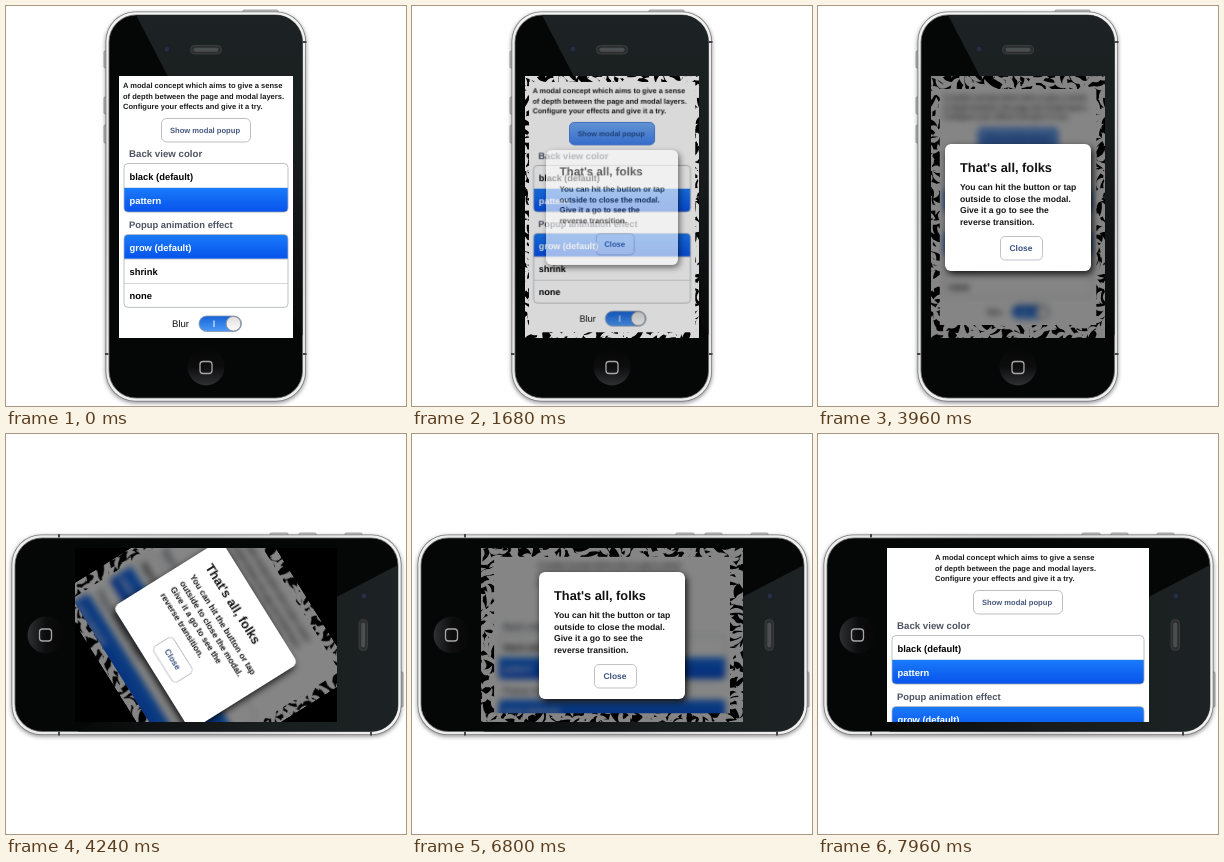
An HTML page with a canvas that plays this animation: 400 by 400 pixels, repeating every 8000 ms.

```html
<!DOCTYPE html>
<html lang="en">
<head>
<meta charset="utf-8">
<title>Modal depth demo</title>
<style>
html, body { margin: 0; width: 100%; height: 100%; overflow: hidden; background: #fff; }
canvas { display: block; width: 400px; height: 400px; }
</style>
</head>
<body>
<canvas id="stage"></canvas>
<script>
const LOOP = 8000, CX = 200, CY = 201, SHORT = 174, LONG = 262, LAYER = 270;
const dpr = window.devicePixelRatio || 1;
const FONT = '"Liberation Sans", Arial, sans-serif';

function makeLayer(size, el = document.createElement('canvas')) {
  el.width = el.height = size * dpr;
  const g = el.getContext('2d');
  g.scale(dpr, dpr);
  g.textRendering = 'geometricPrecision';
  return g;
}
const ctx = makeLayer(400, document.getElementById('stage'));
const pageLayer = makeLayer(LAYER);
const modalLayer = makeLayer(LAYER);
const pattern = makeLayer(LAYER);

const lerp = (a, b, k) => a + (b - a) * k;
function ease(t, from, to) {
  const k = Math.min(1, Math.max(0, (t - from) / (to - from)));
  return k * k * (3 - 2 * k);
}

function box(g, x, y, w, h, r, fill, stroke, line = 1) {
  g.beginPath();
  g.roundRect(x, y, w, h, r);
  if (fill) { g.fillStyle = fill; g.fill(); }
  if (stroke) { g.strokeStyle = stroke; g.lineWidth = line; g.stroke(); }
}
function disc(g, x, y, r, fill, stroke) {
  box(g, x - r, y - r, 2 * r, 2 * r, r, fill, stroke);
}
function shade(g, y0, y1, ...colors) {
  const s = g.createLinearGradient(0, y0, 0, y1);
  colors.forEach((c, i) => s.addColorStop(i / (colors.length - 1), c));
  return s;
}
function text(g, s, x, y, size, color, weight = 'bold') {
  g.font = `${weight} ${size}px ${FONT}`;
  g.fillStyle = color;
  g.fillText(s, x, y);
}

// Curled leaves scattered over black
function paintPattern(g) {
  let seed = 11;
  const rnd = () => (seed = seed * 16807 % 2147483647) / 2147483647;
  g.fillStyle = '#000';
  g.fillRect(0, 0, LAYER, LAYER);
  g.fillStyle = '#fff';
  for (let y = 0; y < 280; y += 8) {
    for (let x = 0; x < 280; x += 8) {
      const len = 11 + rnd() * 9, bend = (rnd() < .5 ? -1 : 1) * (6 + rnd() * 4);
      g.save();
      g.translate(x + rnd() * 5, y + rnd() * 5);
      g.rotate(Math.sin(x / 23) * 2 + Math.cos(y / 19) * 2 + rnd());
      g.beginPath();
      g.moveTo(-len / 2, 0);
      g.bezierCurveTo(-len / 3, bend, len / 3, bend, len / 2, -bend / 4);
      g.bezierCurveTo(len / 4, bend * .2, -len / 5, bend * .15, -len / 2, 0);
      g.fill();
      g.restore();
    }
  }
}

function table(g, w, y, rows, selected) {
  const x = 5, tw = w - 10, rh = 24.3;
  g.save();
  box(g, x, y, tw, rh * rows.length, 4, '#fff');
  g.clip();
  rows.forEach((label, i) => {
    const top = y + i * rh, on = i === selected;
    if (on) {
      g.fillStyle = shade(g, top, top + rh, '#1a7bfa', '#0753ec');
      g.fillRect(x, top, tw, rh);
    } else if (i) {
      g.fillStyle = '#ccc';
      g.fillRect(x, top, tw, .8);
    }
    text(g, label, 10.5, top + 16, 9.4, on ? '#fff' : '#000');
  });
  g.restore();
  box(g, x, y, tw, rh * rows.length, 4, null, '#adb0b5', .8);
}

function paintPage(g, w, pressed) {
  const mid = w / 2;
  g.fillStyle = '#fff';
  g.fillRect(0, 0, LAYER, LAYER);
  ['A modal concept which aims to give a sense',
   'of depth between the page and modal layers.',
   'Configure your effects and give it a try.'
  ].forEach((s, i) => text(g, s, mid - 83, 12 + i * 10.6, 7.55, '#1c1c1c'));

  box(g, mid - 44.5, 42.5, 89, 23.5, 5,
    pressed ? shade(g, 42, 66, '#74aef8', '#3f80ee') : '#fff', pressed ? '#3d78d8' : '#b4b7bd', .9);
  text(g, 'Show modal popup', mid - 36, 57, 7.6, pressed ? '#234a8c' : '#46587f');

  text(g, 'Back view color', 10, 81, 9.7, '#4c5361');
  table(g, w, 87.5, ['black (default)', 'pattern'], 1);
  text(g, 'Popup animation effect', 10, 151.5, 9.4, '#4c5361');
  table(g, w, 158.5, ['grow (default)', 'shrink', 'none'], 0);

  text(g, 'Blur', mid - 34, 251, 9.6, '#111', 'normal');
  box(g, mid - 7, 240, 42.5, 15.5, 7.7, shade(g, 240, 256, '#1763d8', '#4f9cf8'), '#8a96aa', .8);
  g.fillStyle = '#fff';
  g.fillRect(mid + 7.5, 244.5, 1, 6.5);
  disc(g, mid + 27.5, 247.7, 7.3, shade(g, 240, 256, '#ddd', '#fff'), '#999');
}

function paintModal(g) {
  g.translate(LAYER / 2, LAYER / 2);
  g.save();
  g.shadowColor = 'rgba(0,0,0,.85)';
  g.shadowBlur = 7 * dpr;
  g.shadowOffsetX = 2 * dpr;
  g.shadowOffsetY = 3 * dpr;
  box(g, -73, -63, 146, 127, 6, '#fff');
  g.restore();
  text(g, "That's all, folks", -58, -35, 12.8, '#111');
  ['You can hit the button or tap', 'outside to close the modal.',
   'Give it a go to see the', 'reverse transition.'
  ].forEach((s, i) => text(g, s, -58, -17 + i * 11.5, 8.6, '#161616'));
  box(g, -17.5, 29.5, 42, 23.5, 4.5, '#fff', '#b9bcc2', .9);
  text(g, 'Close', -8.5, 44.2, 8.4, '#3a5180');
}

// Screen contents centred on the origin; the page is laid out for pageW by pageH
// and stretched to w by h
function paintScreen(g, w, h, pageW, pageH, p, pressed) {
  const whole = () => { g.beginPath(); g.rect(-w / 2, -h / 2, w, h); };
  g.save();
  whole();
  g.clip();
  if (p > 0) g.drawImage(pattern.canvas, -LAYER / 2, -LAYER / 2, LAYER, LAYER);

  paintPage(pageLayer, pageW, pressed);
  g.save();
  g.scale(1 - .1 * p, 1 - .1 * p);
  whole();
  g.clip();
  g.fillStyle = '#fff';
  g.fill();
  const blur = 3 * Math.max(0, (p - .3) / .7);
  if (blur > 0) g.filter = `blur(${blur * dpr}px)`;
  g.drawImage(pageLayer.canvas, -w / 2, -h / 2, LAYER * w / pageW, LAYER * h / pageH);
  g.restore();

  if (p > 0) {
    g.fillStyle = `rgba(0,0,0,${.48 * p ** 1.4})`;
    g.fillRect(-w / 2, -h / 2, w, h);
    const size = LAYER * (.83 + .17 * p);
    g.globalAlpha = Math.min(1, p * 1.4);
    g.drawImage(modalLayer.canvas, -size / 2, -size / 2, size, size);
  }
  g.restore();
}

// Upright phone, in stage coordinates
function paintPhone(g) {
  const metal = '#d4d4d4';
  [[45, 17], [91, 17], [119, 18]].forEach(([y, h]) =>
    box(g, 98, y, 4, h, 1.2, metal, '#888', .7));
  box(g, 237, 4, 35, 4, 1.2, metal, '#888', .7);
  g.save();
  g.shadowColor = 'rgba(0,0,0,.45)';
  g.shadowBlur = 4 * dpr;
  g.shadowOffsetY = 1.5 * dpr;
  box(g, 99.5, 5.5, 200.5, 390, 30, '#777');
  g.restore();
  box(g, 100.3, 6.3, 198.9, 388.4, 29, shade(g, 5, 396, '#f4f4f4', '#d2d2d2', '#f0f0f0'));
  g.fillStyle = '#444';
  [[99, 347], [297, 347], [297, 35]].forEach(([x, y]) => g.fillRect(x, y, 3.5, 2));

  box(g, 103, 9, 193.5, 383, 27, '#050606', '#666', .8);
  g.save();
  g.clip();
  g.beginPath();
  g.moveTo(130, 9);
  g.lineTo(297, 9);
  g.lineTo(297, 330);
  g.fillStyle = shade(g, 9, 330, '#1d2324', '#171b1c', '#070808');
  g.fill();
  g.restore();

  box(g, 184.5, 39.5, 31, 8.5, 4, '#2c2e2f', '#3f4243', .8);
  box(g, 187.5, 41.8, 25, 4, 2, '#4b4e50');
  disc(g, 161, 43, 4.6, '#1b2028');
  disc(g, 161, 43, 2.3, '#272f45');

  disc(g, 200, 361, 18.5, shade(g, 342, 380, '#060606', '#0d0d0e', '#303134'));
  box(g, 194, 355.5, 12, 12, 3, null, '#a6a6a6', 1.3);
  g.fillStyle = '#000';
  g.fillRect(CX - SHORT / 2, CY - LONG / 2, SHORT, LONG);
}

function draw(t) {
  const p = ease(t, 1480, 1920) * (1 - ease(t, 7480, 7930));
  const pressed = t >= 1440 && t < 7930;
  const turn = ease(t, 3960, 4120), settle = ease(t, 4080, 4480);
  const grow = Math.sqrt(settle), quarter = Math.PI / 2;
  const layout = settle > 0 ? [LONG, SHORT] : [SHORT, LONG];

  ctx.fillStyle = '#fff';
  ctx.fillRect(0, 0, 400, 400);
  ctx.save();
  ctx.translate(CX, CY);
  ctx.rotate(quarter * turn);
  ctx.translate(-CX, -CY);
  paintPhone(ctx);
  ctx.beginPath();
  ctx.rect(CX - SHORT / 2, CY - LONG / 2, SHORT, LONG);
  ctx.clip();
  ctx.translate(CX, CY);
  ctx.rotate(-quarter * settle);
  paintScreen(ctx, lerp(SHORT, LONG, grow), lerp(LONG, SHORT, grow), ...layout, p, pressed);
  ctx.restore();
}

paintPattern(pattern);
paintModal(modalLayer);
const start = performance.now();
function frame() {
  draw((performance.now() - start) % LOOP);
  requestAnimationFrame(frame);
}
frame();
</script>
</body>
</html>
```
